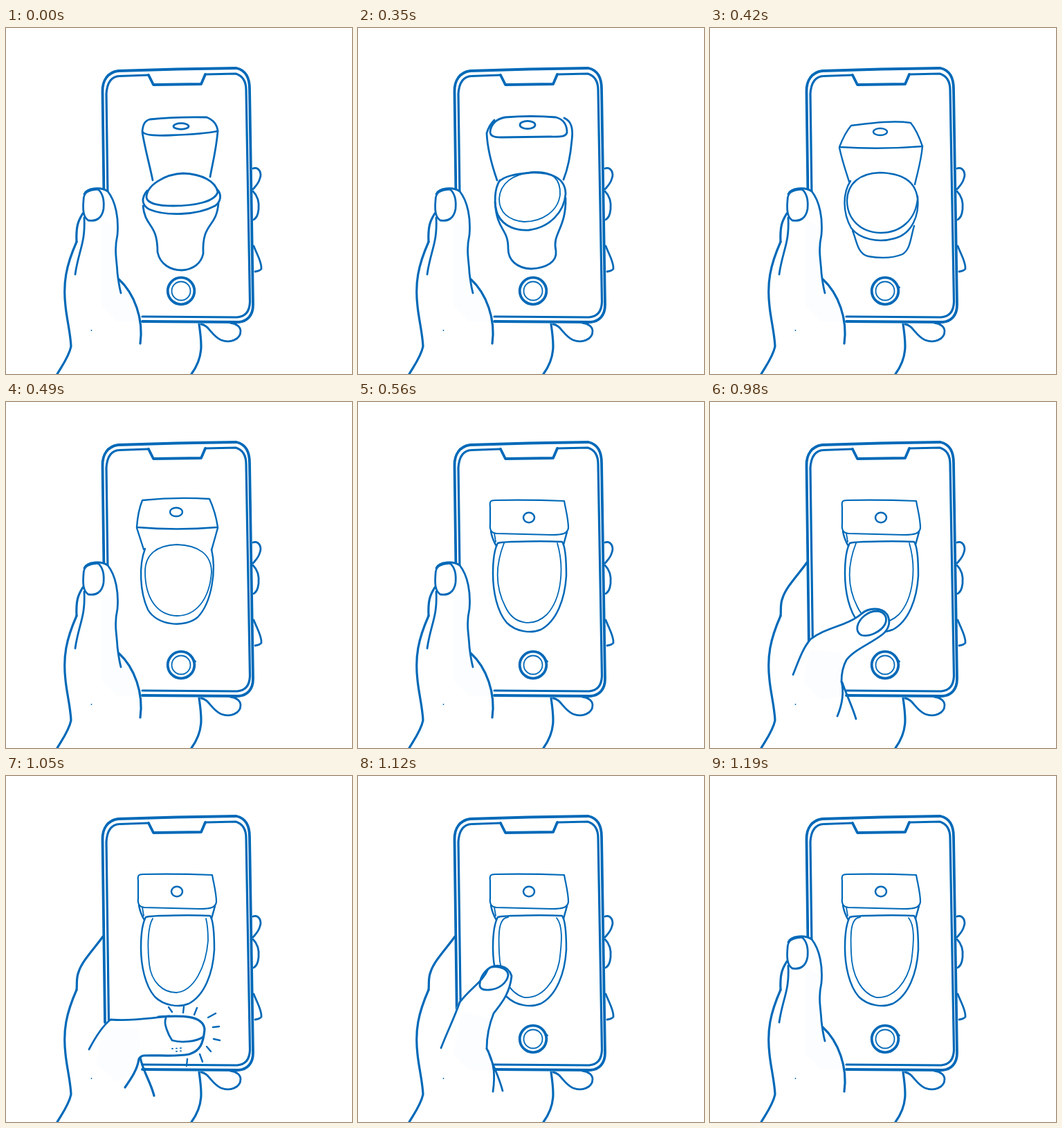
These frames come from a looping animation (500x500 px, 1.54 s). An HTML page:

```html
<!DOCTYPE html>
<html lang="en">
<head>
<meta charset="utf-8">
<title>Phone tap</title>
<style>
html, body { margin: 0; width: 100%; height: 100%; overflow: hidden; background: #fff; }
svg { display: block; width: 100vw; height: 100vh; }
svg { fill: none; stroke: #0069b8; stroke-width: 2.8; stroke-linecap: round; stroke-linejoin: round; }
.bold { stroke-width: 3.8; }
.mid { stroke-width: 3.2; }
.thin { stroke-width: 1.8; }
.mask { fill: #fff; stroke: none; }
.tint { fill: #fcfdff; stroke: none; }
.dot { fill: #0069b8; stroke: none; }

/* The 1540 ms loop has 22 beats of 70 ms; every pose is a hard cut. */
.pose { opacity: 0; animation: 1540ms step-end infinite; }
#front { animation-name: front; }
#tilt1 { animation-name: tilt1; }
#tilt2 { animation-name: tilt2; }
#tilt3 { animation-name: tilt3; }
#top { animation-name: top; }
#tick { animation-name: tick; }
#rimA { animation-name: rimA; }
#rimB { animation-name: rimB; }
#rimC { animation-name: rimC; }
#rest { animation-name: rest; }
#lean { animation-name: lean; }
#reach { animation-name: reach; }
#press { animation-name: press; }
#reached { animation-name: reached; }
@keyframes front { 0% { opacity: 1 } 22.727%, to { opacity: 0 } }
@keyframes tilt1 { 0% { opacity: 0 } 22.727% { opacity: 1 } 27.273%, to { opacity: 0 } }
@keyframes tilt2 { 0% { opacity: 0 } 27.273% { opacity: 1 } 31.818%, to { opacity: 0 } }
@keyframes tilt3 { 0% { opacity: 0 } 31.818% { opacity: 1 } 36.364%, to { opacity: 0 } }
@keyframes top { 0% { opacity: 0 } 36.364%, to { opacity: 1 } }
@keyframes tick { 0% { opacity: 0 } 27.273%, to { opacity: 1 } }
@keyframes rimA { 0% { opacity: 0 } 36.364% { opacity: 1 } 68.182%, to { opacity: 0 } }
@keyframes rimB { 0% { opacity: 0 } 68.182% { opacity: 1 } 72.727%, to { opacity: 0 } }
@keyframes rimC { 0% { opacity: 0 } 72.727%, to { opacity: 1 } }
@keyframes rest { 0% { opacity: 1 } 59.091% { opacity: 0 } 77.273%, to { opacity: 1 } }
@keyframes lean { 0% { opacity: 0 } 59.091% { opacity: 1 } 63.636% { opacity: 0 } 72.727% { opacity: 1 } 77.273%, to { opacity: 0 } }
@keyframes reach { 0% { opacity: 0 } 63.636% { opacity: 1 } 68.182%, to { opacity: 0 } }
@keyframes press { 0% { opacity: 0 } 68.182% { opacity: 1 } 72.727%, to { opacity: 0 } }
@keyframes reached { 0% { opacity: 0 } 59.091% { opacity: 1 } 77.273%, to { opacity: 0 } }
</style>
</head>
<body>
<svg viewBox="0 0 500 500">
  <!-- phone -->
  <g class="bold">
    <path d="M143 356 L139.5 92 C139 76 147 64 162 62 Q245 59 333 58 C346 61 352 72 352 88 L357 400 C357 415 349 424 336 425 L197 424"/>
    <path class="mid" d="M148.500 354 L145 95 C146 80 152 70 164 69.500 L206 68"/>
    <path d="M206 68 L213 82 L282 81 L288 67"/>
    <path class="mid" d="M288 67 L332 66 C342 69 347 76 347 90 L352.500 396 C352 410 346 417 334 418 L197 417"/>
  </g>
  <circle class="bold" cx="253" cy="380" r="19.3"/>
  <circle class="thin" cx="253" cy="380" r="13.5"/>
  <path id="tick" class="pose thin" d="M273 374 L274 375"/>

  <!-- fingers and wrist -->
  <g>
    <path d="M357 203 C365 200 370 209 367 217 C365 225 361 228 357 233"/>
    <path d="M357 236 C363 242 366 252 365 262 C364 271 362 274 358 277"/>
    <path d="M358 315 C363 328 370 339 369 348 Q367 351 360 352"/>
    <path d="M282 428 C294 430 296 444 311 451 C324 456 339 450 339 438 C339 432 333 427 324 426"/>
    <path class="mid" d="M279 428 C283 455 286 475 268 500"/>
  </g>

  <!-- toilet, turning from front to top view -->
  <g id="front" class="pose">
    <path d="M197 149 C198 140 200 134 208 132 Q246 128 290 129 C300 133 305 139 306 149 C292 152 266 154 238 155 C216 156 198 155 197 149Z"/>
    <ellipse cx="253" cy="142" rx="11" ry="4.3"/>
    <path d="M197 151 C201 175 208 200 212 220 M306 149 C304 175 298 198 295 215"/>
    <path d="M203 245 C203 227 230 211 256 210 C284 211 303 222 306 237 C302 251 273 257 242 257 C219 257 204 253 203 245Z"/>
    <path d="M204 235 C195 246 196 256 207 262 C230 272 276 271 302 257 C311 251 312 240 305 233"/>
    <path d="M198 257 C201 289 219 281 219 324 C223 342 238 350 254 350 C271 349 282 340 285 326 C283 280 304 290 307 253"/>
  </g>
  <g id="tilt1" class="pose">
    <path d="M191 150 C192 139 200 131 213 129 Q250 126 286 129 C297 132 302 140 302 151 C300 158 291 157 278 157 L207 158 C196 158 191 156 191 150Z"/>
    <ellipse cx="245" cy="140" rx="11" ry="5.7"/>
    <path d="M197 133 Q189 141 186 152 C187 175 194 200 201 220 M298 130 C309 135 311 146 309 162 C307 185 303 204 297 219"/>
    <path class="thin" d="M204 247 C205 225 223 211 253 208 C282 206 293 219 292 241 C289 265 266 280 240 280 C217 278 204 266 204 247Z"/>
    <path d="M205 220 C197 232 196 255 202 270 C211 288 230 293 247 292 C278 288 298 265 300 240 C300 216 278 208 250 209 C230 211 211 213 203 223"/>
    <path d="M198 252 C201 295 217 288 217 319 C217 335 229 347 250 348 C272 347 288 338 286 322 C280 297 301 290 300 246"/>
  </g>
  <g id="tilt2" class="pose" stroke-width="2.4">
    <path d="M187 172 C192 159 197 149 204 141 C229 138 262 133 290 137 C298 147 303 159 307 171 Q247 176 187 172Z"/>
    <ellipse cx="246" cy="150" rx="10" ry="5"/>
    <path d="M187 173 C191 192 196 206 201 222 M307 171 C305 193 300 208 296 226"/>
    <path d="M198 249 C199 224 217 210 245 209 C278 210 297 221 300 247 C297 277 276 296 246 296 C216 295 198 275 198 249Z"/>
    <path d="M203 221 C192 238 191 266 204 289 C216 305 243 311 267 304 C292 297 303 271 300 243"/>
    <path d="M206 293 C212 307 213 327 229 330 Q258 335 278 327 C290 320 290 302 295 286"/>
  </g>
  <g id="tilt3" class="pose" stroke-width="2.4">
    <path d="M189 181 C190 166 193 152 197 142 Q245 137 294 140 C300 153 304 167 306 181 Q247 186 189 181Z"/>
    <ellipse cx="246" cy="159" rx="9" ry="6.3"/>
    <path d="M189 182 L199 213 M306 182 L297 214"/>
    <path class="thin" d="M201 245 C201 221 217 207 247 206 C278 207 297 220 297 246 C294 286 274 309 247 309 C217 308 201 282 201 245Z"/>
    <path d="M201 212 C192 235 193 274 205 300 C218 323 258 327 277 311 C298 289 304 242 297 213"/>
  </g>
  <g id="top" class="pose" stroke-width="2.5">
    <path d="M191 152 C190 144 191 142 198 142 Q246 141 298 143 C300 155 304 169 304 182 C303 190 296 192 280 192 Q237 191 200 190 C192 189 190 184 191 177Z" stroke-width="2.2"/>
    <ellipse cx="247" cy="167" rx="8" ry="7.3"/>
    <path d="M192 187 C194 197 196 202 200 208 M302 188 L297 206"/>
    <path class="thin" d="M197 190 L199 202"/>
    <path d="M202 204 C210 201 274 201 295 202 C300 209 301 235 301 251 C299 285 287 317 264 329 C250 335 228 332 215 319 C201 303 195 274 195 248 C195 229 197 213 202 204Z"/>
    <g class="thin">
      <path id="rimA" class="pose" d="M211 204 C200 232 197 265 213 296 C225 322 253 326 273 307 C295 283 298 238 288 204"/>
      <path id="rimB" class="pose" d="M212 206 C205 217 204 246 207 272 C210 298 227 313 246 313 C272 311 289 275 292 238 C292 224 291 214 289 206"/>
      <path id="rimC" class="pose" d="M217 204 C202 205 203 232 204 255 C205 289 219 314 240 320 C266 322 285 297 291 268 C295 238 296 216 287 205"/>
    </g>
  </g>

  <!-- shared edge of the hand -->
  <path class="mid" d="M102 309 C87 343 82 368 86 402 C88 422 93 440 94 460 C91 475 81 488 74 500"/>
  <path class="pose mid" id="reached" d="M140 232 C128 249 110 267 105 283 C101 292 103 302 102 309"/>

  <!-- thumb poses -->
  <g id="rest" class="pose">
    <path class="mask" d="M113 240 C118 231 138 228 147 236 C158 250 162 275 162 295 C156 325 161 350 163 363 C188 386 196 421 195 457 L100 457 L100 356 C115 315 114 300 114 275Z"/>
    <path class="tint" d="M138 276 L161 290 L158 325 L163 366 Q186 388 192 425 L160 424 L138 402Z"/>
    <path d="M113 240 C117 231 137 229 147 236 C159 251 163 276 161 299 C156 322 160 334 161 354 Q163 371 166 383"/>
    <path class="mid" d="M163 363 C186 384 199 421 194 456"/>
    <path class="mid" d="M111 268 C104 279 101 287 102 309"/>
    <path d="M113 274 C115 311 105 321 100 356"/>
    <path d="M112 249 C112 238 118 234 133 233 C140 239 142 250 141 261 C139 275 130 280 119 278 C111 273 111 261 112 249Z"/>
  </g>
  <g id="lean" class="pose">
    <path class="mask" d="M143 333 C161 308 177 298 188 279 C196 271 219 273 222 290 C219 318 201 333 195 344 C188 365 186 377 186 394 Q198 420 195 457 L100 457 L120 393Z"/>
    <path class="tint" d="M150 340 L188 350 L186 394 L194 425 L160 425 L138 402Z"/>
    <path d="M147 327 C163 306 180 298 188 279 C196 271 217 272 222 289 C219 318 203 333 196 343 C188 363 186 377 186 394"/>
    <path d="M147 327 C139 350 130 367 120 393"/>
    <path d="M186 394 C198 416 198 435 195 456 M188 397 C195 420 203 432 209 455"/>
    <path d="M176 300 C177 289 185 279 193 276 C207 274 217 280 217 288 C215 299 204 308 190 309 C180 310 175 307 176 300Z"/>
  </g>
  <g id="reach" class="pose">
    <path class="mask" d="M145 343 C168 325 198 324 219 306 C229 297 248 296 256 307 C262 318 258 329 249 336 C231 350 208 358 197 373 Q190 386 190 404 L195 457 L100 457 L120 394Z"/>
    <path class="tint" d="M144 358 L190 362 L190 404 L194 425 L160 430 L135 405Z"/>
    <path d="M120 394 C128 374 134 356 145 343 C168 325 198 324 219 306 C229 297 248 296 256 307 C262 318 258 329 249 336 C231 350 208 358 197 373 Q190 386 190 404"/>
    <path d="M190 404 C194 420 191 437 184 454 M191 405 C197 423 205 438 211 458"/>
    <path d="M213 324 C216 312 229 302 241 302 C253 303 257 312 253 321 C247 332 230 340 219 337 C213 334 212 329 213 324Z"/>
  </g>
  <g id="press" class="pose">
    <path class="mask" d="M120 395 C129 377 139 355 154 352 C181 354 207 350 236 347 C265 345 287 348 287 368 C285 392 273 404 249 403 L199 403 L192 409 C190 424 181 437 172 450 L100 455Z"/>
    <path class="tint" d="M140 362 L192 365 L194 402 L190 425 L160 442 L130 415Z"/>
    <path d="M120 395 C131 374 141 360 151 352 C181 354 207 350 236 347"/>
    <path class="mid" d="M220 348 C252 346 285 345 287 366 C285 388 280 397 265 402 C245 406 219 403 199 404 Q194 405 192 409 C190 424 181 437 172 450"/>
    <path class="mid" d="M194 407 C198 427 209 442 214 462"/>
    <path d="M231 350 C227 357 235 375 240 382 C253 386 275 384 285 377"/>
    <path class="thin" stroke-width="1" stroke-dasharray="1 5" d="M240 394 L256 393 M246 398 L257 397"/>
    <path stroke-width="2.4" d="M235 334 L240 341 M257 333 L256 342 M276 335 L272 345 M303 343 L292 349 M308 362 L299 363 M300 380 L309 382 M290 391 L296 398 M280 402 L284 413 M262 409 L261 419"/>
  </g>
  <circle class="dot" cx="123.5" cy="437" r=".9"/>
</svg>
</body>
</html>
```
